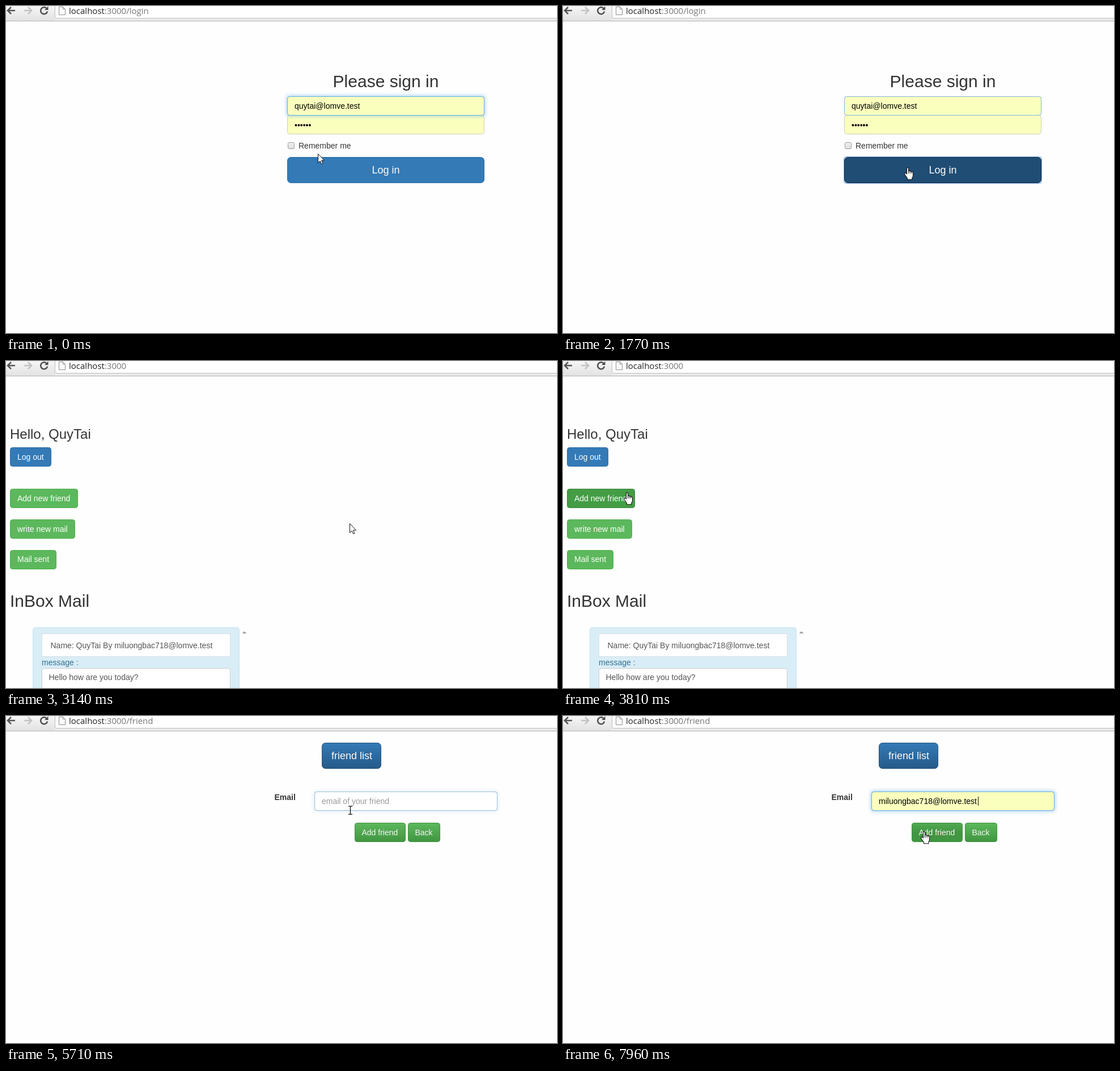
An HTML page for the animation above (8 s loop, 972 by 576 pixels).

```html
<!DOCTYPE html>
<html lang="en">
<head>
<meta charset="utf-8">
<title>Sign in and add a friend</title>
<style>
html, body { margin: 0; width: 100%; height: 100%; overflow: hidden; background: #fefefe; }
svg { display: block; font-family: "Liberation Sans", Arial, sans-serif; }
.url, .hint { font-family: "Open Sans", "Noto Sans", sans-serif; }
.halo { filter: blur(3px); }
.raised text { text-shadow: 0 -1px 0 rgba(0, 0, 0, .2); }
</style>
</head>
<body>
<svg id="stage" width="972" height="576" viewBox="0 0 972 576"></svg>
<script>
const LOOP = 8000;
const ME = 'QuyTai', MY_MAIL = 'quytai@lomve.test', FRIEND = 'miluongbac718@lomve.test';
const HINTS = [FRIEND, 'miluongbac@ronadu.test', 'Miga@lomve.test', 'miluongbac@nubelpa.test'];

// Markup helpers; boxes are given by their outer edges
const box = (x, y, w, h, fill, stroke, r = 4, more = '') =>
  `<rect x="${x + .5}" y="${y + .5}" width="${w - 1}" height="${h - 1}" rx="${r}" fill="${fill}" stroke="${stroke}" ${more}/>`;
const text = (x, y, size, fill, str, more = '') =>
  `<text x="${x}" y="${y}" font-size="${size}" fill="${fill}" ${more}>${str}</text>`;
const button = (id, x, y, w, h, fill, stroke, label, tx, ty, size = 14) =>
  box(x, y, w, h, fill, stroke, size > 14 ? 6 : 4, `id="${id}"`) + text(tx, ty, size, '#fff', label);
const input = (id, x, y, w) =>
  `<rect id="${id}Halo" class="halo" x="${x - 1}" y="${y - 1}" width="${w + 2}" height="36" rx="4" fill="#66afe9" opacity="0"/>` +
  box(x, y, w, 34, '#fff', '#ccc', 4, `id="${id}"`) +
  box(x, y, w, 34, 'none', '#66afe9', 4, `id="${id}Ring" opacity="0"`);
const caret = (id, x, y) => `<rect id="${id}" x="${x}" y="${y}" width="1" height="16" fill="#111"/>`;
const fade = (id, stops) => `<linearGradient id="${id}" x2="0" y2="1">` +
  stops.map(([at, c]) => `<stop offset="${at}" stop-color="${c}"/>`).join('') + '</linearGradient>';

const defs = '<defs>' +
  fade('bar', [[0, '#f6f6f6'], [1, '#e2e2e2']]) +
  fade('blue', [[0, '#337ab7'], [1, '#265a88']]) +
  fade('green', [[0, '#5cb85c'], [1, '#419641']]) +
  fade('greenHover', [[0, '#50a950'], [.56, '#419641'], [1, '#419641']]) +
  fade('check', [[0, '#f2f2f2'], [1, '#dcdcdc']]) + '</defs>';

const arrowIcon = (x, color) =>
  `<path d="M${x + 15} 8H${x + 2}M${x + 8} 2L${x + 2} 8L${x + 8} 14" fill="none" stroke="${color}" stroke-width="2.6"/>`;

const chrome = `
  <rect width="972" height="26" fill="#ebebeb"/>
  <rect width="86" height="26" fill="url(#bar)"/>
  <path d="M0 26.5H972" stroke="#b2b2b2"/>
  <path d="M86.5 0V19Q86.5 21.5 89 21.5H972V0Z" fill="#fff"/>
  <path d="M86.5 0V19Q86.5 21.5 89 21.5H972" fill="none" stroke="#bdbdbd"/>
  ${arrowIcon(1, '#555')}${arrowIcon(46, '#c3c3c3').replace('<path', '<path transform="matrix(-1 0 0 1 92 0) translate(-1)"')}
  <g id="reload"><path d="M71.5 4A6 6 0 1 0 73 9.5" fill="none" stroke="#4d4d4d" stroke-width="2.5"/>
    <path d="M74.5 .5V7H68Z" fill="#4d4d4d"/></g>
  <path id="stop" d="M61.5 2.5L72.5 13.5M72.5 2.5L61.5 13.5" stroke="#4d4d4d" stroke-width="2.8"/>
  <path d="M93.5 1.5H100.5L104.5 5.5V15.5H93.5ZM100.5 1.5V5.5H104.5" fill="#fafafa" stroke="#909090"/>
  <text class="url" x="111" y="14" font-size="15" fill="#222">localhost<tspan fill="#777">:3000</tspan><tspan id="path" fill="#777"></tspan></text>`;

const login = `<g id="login">
  ${text(576.6, 143, 30, '#333', 'Please sign in')}
  ${box(496, 192, 348, 34, '#faffbd', '#ccc')}
  ${text(509, 215, 14, '#000', '••••••')}
  ${input('mail', 496, 159, 348)}
  ${text(509, 181, 14, '#000', MY_MAIL)}${caret('mailCaret', 625, 168)}
  ${box(497, 240, 12, 12, 'url(#check)', '#9c9c9c', 2)}
  ${text(516, 251, 14, '#333', 'Remember me')}
  <rect id="logFocus" x="495.5" y="265.5" width="349" height="47" rx="3" fill="#cfe0f7" stroke="#8db6ee"/>
  ${button('logIn', 496, 266, 348, 46, '#337ab7', '#2e6da4', 'Log in', 645.5, 295, 18)}
</g>`;

const inbox = `<g id="inbox">
  ${text(7, 137, 24, '#333', 'Hello, ' + ME)}
  ${button('logOut', 7, 152, 73, 34, '#337ab7', '#2e6da4', 'Log out', 20, 174)}
  ${button('addNew', 7, 225, 120, 34, '#5cb85c', '#4cae4c', 'Add new friend', 20, 247)}
  ${button('write', 7, 279, 115, 34, '#5cb85c', '#4cae4c', 'write new mail', 20, 301)}
  ${button('sent', 7, 333, 82, 34, '#5cb85c', '#4cae4c', 'Mail sent', 20, 354)}
  ${text(7, 433, 30, '#333', 'InBox Mail')}
  ${box(47, 469, 365, 130, '#d9edf7', '#c6e4ee')}
  ${box(63, 480, 333, 41, '#fff', '#d8dfe2', 0)}
  ${text(78.5, 506, 14, '#555', `Name: ${ME} By ${FRIEND}`)}
  ${text(63, 536, 14, '#31708f', 'message :')}
  ${box(63, 541, 333, 60, '#fff', '#ccc')}
  ${text(75.5, 562, 14, '#555', 'Hello how are you today?')}
  <path d="M416.5 480L420.5 476L424.5 480Z" fill="#a0a0a0"/>
</g>`;

const friend = `<g id="friend">
  <g class="raised">
    ${button('list', 557, 47, 105, 46, 'url(#blue)', '#245580', 'friend list', 574, 76, 18)}
    ${button('add', 615, 188, 90, 34, 'url(#green)', '#3e8f3e', 'Add friend', 627.5, 210)}
    ${button('back', 709, 188, 57, 34, 'url(#green)', '#3e8f3e', 'Back', 721.5, 210)}
  </g>
  ${text(473.5, 148, 14, '#333', 'Email', 'font-weight="bold"')}
  ${input('to', 544, 133, 323)}
  ${text(557, 155, 14, '#999', '', 'id="toText"')}${caret('toCaret', 557, 142)}
  <g id="hints">
    ${box(544, 167, 323, 97, '#fff', '#c0c0c8', 0)}
    <rect id="pick" x="545" y="168" width="321" height="24" fill="#cdcdcd"/>
    ${HINTS.map((h, i) => text(553, 184 + i * 23.8, 11.4, '#111', h, 'class="hint" font-weight="bold"')).join('')}
  </g>
</g>`;

const cursors = `<g id="cursor" stroke-linejoin="round">
  <path id="arrow" d="M.5 .5V16.5L4.2 13L6.6 18.4L9 17.4L6.7 12H11.5Z" fill="#fff" stroke="#111"/>
  <path id="beam" d="M0 .8H2.5L3.5 1.5L4.5 .8H7M0 15.2H2.5L3.5 14.5L4.5 15.2H7M3.5 1.5V14.5" fill="none" stroke="#111" stroke-width="1.3"/>
  <g id="hand"><path d="M4.5 2Q4.5 .6 6 .6T7.5 2V6.5Q9 5.8 10 7Q11.6 6.4 12.6 7.8Q15.5 7.6 15.5 10.5V15Q15.5 17 13.8 19V21.8H5.5V19.5L1.2 13.2Q0 11 1.2 10.2T4.5 12Z" fill="#fff" stroke="#111" stroke-width="1.1"/>
    <path d="M7.5 6.5V11M10.1 7.2V11M12.7 8V11" stroke="#111"/></g>
</g>`;

document.getElementById('stage').innerHTML =
  defs + '<rect width="972" height="576" fill="#fefefe"/>' + chrome + login + inbox + friend + cursors;

// Each track lists [start, ...values]; a value holds until the next start
const pointer = [
  [0, 'arrow', 550, 260], [120, 'arrow', 551, 233], [390, 'beam', 562, 212], [550, 'arrow', 571, 226],
  [690, 'arrow', 585, 252], [815, 'hand', 596, 274], [940, 'hand', 602, 284],
  [2050, 'arrow', 606, 286], [2450, 'hand', 602, 284], [3140, 'arrow', 606, 286],
  [3560, 'arrow', 430, 264], [3685, 'arrow', 200, 243], [3810, 'hand', 107, 231],
  [4460, 'arrow', 190, 248], [4580, 'arrow', 280, 260], [4730, 'arrow', 375, 270], [5010, 'arrow', 381, 267],
  [5160, 'arrow', 500, 217], [5280, 'arrow', 581, 177], [5440, 'beam', 604, 158],
  [6150, 'beam', 606, 155], [6890, 'beam', 607, 153], [7010, 'arrow', 621, 180], [7160, 'arrow', 621, 182],
  [7835, 'arrow', 627, 194], [7960, 'hand', 631, 203]];
const pages = [[0, 'login'], [3140, 'inbox'], [4460, 'friend']];
const paths = [[0, '/login'], [2450, ''], [4340, '/friend']];
const logStyle = [[0, '#337ab7', '#2e6da4'], [815, '#286090', '#204d74'], [1770, '#204d74', '#122b40'],
  [2050, '#286090', '#204d74']];
const addStyle = [[0, '#5cb85c', '#4cae4c'], [3810, '#449d44', '#398439'], [3950, '#398439', '#255625'],
  [4200, '#449d44', '#398439']];
const mailGlow = [[0, 1, .6], [1770, .7, 0], [1900, 0, 0]];
const toGlow = [[0, 0, 0], [5710, .5, .2], [5860, 1, .6]];
const typed = [[0, 'email of your friend', '#999'], [6430, 'm', '#555'], [6740, 'mi', '#555'], [7010, FRIEND, '#000']];
const toCarets = [[0, 0], [5860, 557], [6150, 0], [6430, 569], [6740, 572], [7010, 0], [7710, 732]];

const $ = id => document.getElementById(id);
const at = (track, t) => track.filter(k => k[0] <= t).pop().slice(1);
const between = (t, a, b) => t >= a && t < b;
const show = (id, on) => $(id).style.display = on ? '' : 'none';
const set = (id, attrs) => { for (const k in attrs) $(id).setAttribute(k, attrs[k]); };
const paint = (id, [fill, stroke]) => set(id, { fill, stroke });
const glow = (id, [ring, halo]) => {
  set(id + 'Ring', { opacity: ring });
  set(id + 'Halo', { opacity: halo });
};

function draw(t) {
  const [page] = at(pages, t);
  for (const p of ['login', 'inbox', 'friend']) show(p, p === page);
  const loading = between(t, 2050, 3140) || between(t, 4340, 4730);
  show('stop', loading);
  show('reload', !loading);
  $('path').textContent = at(paths, t)[0];

  set('mail', { fill: '#faffbd' });
  glow('mail', at(mailGlow, t));
  show('mailCaret', between(t, 550, 940) || between(t, 1490, 1770));
  paint('logIn', at(logStyle, t));
  show('logFocus', t >= 1770);
  paint('addNew', at(addStyle, t));

  glow('to', at(toGlow, t));
  set('to', { fill: t >= 7010 ? '#faffbd' : '#fff' });
  const [str, color] = at(typed, t);
  $('toText').textContent = str;
  set('toText', { fill: color });
  const [cx] = at(toCarets, t);
  show('toCaret', cx);
  set('toCaret', { x: cx });
  show('hints', between(t, 6430, 7710));
  show('pick', t >= 7010);
  set('add', { fill: t >= 7835 ? 'url(#greenHover)' : 'url(#green)' });

  const [kind, x, y] = at(pointer, t);
  for (const k of ['arrow', 'beam', 'hand']) show(k, k === kind);
  set('cursor', { transform: `translate(${x} ${y})` });
}

const start = performance.now();
function tick() {
  draw((performance.now() - start) % LOOP);
  requestAnimationFrame(tick);
}
tick();
</script>
</body>
</html>
```
